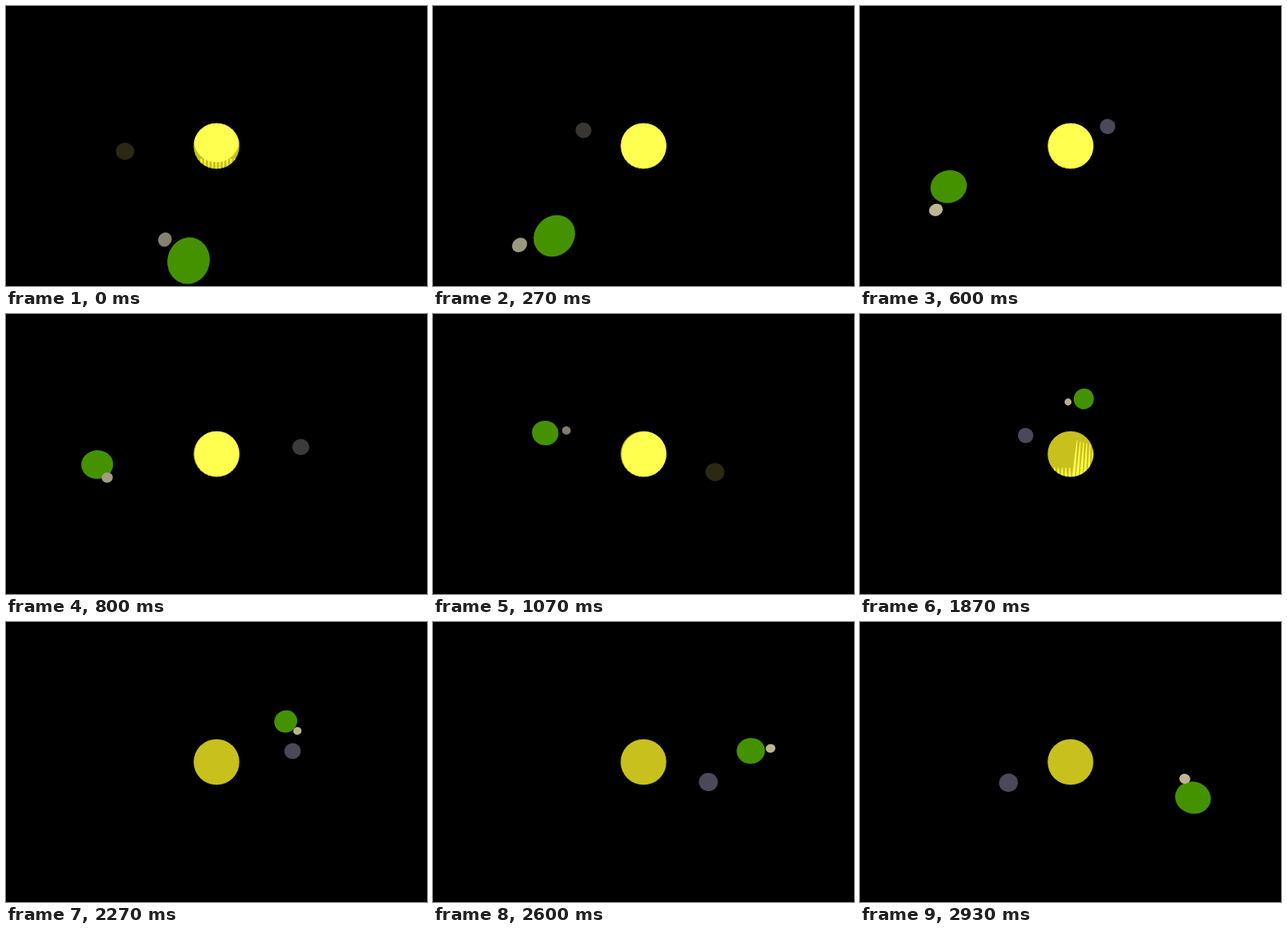
Animation of 512x341 px, one loop 2990 ms. Source, as an HTML page with a canvas:

```html
<!DOCTYPE html>
<html lang="en">
<head>
<meta charset="utf-8">
<title>Orbits</title>
<style>
  html, body { margin: 0; width: 100%; height: 100%; overflow: hidden; background: #000; }
  canvas { display: block; }
</style>
</head>
<body>
<canvas id="stage" width="512" height="341"></canvas>
<script>
const ctx = document.getElementById("stage").getContext("2d");
const LOOP = 2990, STEP = 200 / 3, RAD = Math.PI / 180;
const CX = 256, CY = 170.5, SUN = 27.8;

// Camera at (0, 7, 8) looking at the centre, 60 degree field of view
const DIST = Math.hypot(7, 8), SIN = 7 / DIST, COS = 8 / DIST;
const FOCAL = CY / Math.tan(30 * RAD);

// Rows: step, orbit phase in degrees, warmth of the inner planet, moon light
const KEYS = [
  [0, 0, 1, 0.5], [9, 54, 0, 1], [16, 98.9, 1, 0.45], [21, 132, 1, 0.2],
  [28, 179.9, 0, 0.95], [39, 251.9, 0, 1], [44, 284.8, 0, 1]
];

function track(step, col) {
  let i = 0;
  while (i < KEYS.length - 2 && step > KEYS[i + 1][0]) i++;
  const a = KEYS[i], b = KEYS[i + 1];
  return a[col] + (b[col] - a[col]) * (step - a[0]) / (b[0] - a[0]);
}

function mix(from, to, k) {
  return `rgb(${from.map((v, i) => Math.round(v + (to[i] - v) * k))})`;
}

// A sphere in perspective becomes an ellipse stretched away from the centre
function sphere(x, z, radius, color) {
  const depth = DIST - z * COS;
  const px = FOCAL * x / depth, py = FOCAL * z * SIN / depth;
  const off = Math.hypot(px, py) / FOCAL;
  const cos2 = 1 / (1 + off * off);
  const sin = radius / (depth * Math.sqrt(1 + off * off));
  const gap = cos2 - sin * sin;
  ctx.fillStyle = color;
  ctx.beginPath();
  ctx.ellipse(CX + px, CY + py, FOCAL * sin * Math.sqrt(1 - sin * sin) / gap,
    FOCAL * sin / Math.sqrt(gap), Math.atan2(py, px), 0, 2 * Math.PI);
  ctx.fill();
}

function disc(x, y, r, color) {
  ctx.fillStyle = color;
  ctx.beginPath();
  ctx.arc(x, y, r, 0, 2 * Math.PI);
  ctx.fill();
}

// A streak standing on the lower rim, its tip moved sideways by lean
function streak(x, top, tipWidth, width, lean) {
  ctx.beginPath();
  ctx.moveTo(x + lean - tipWidth / 2, top);
  ctx.lineTo(x + lean + tipWidth / 2, top);
  ctx.lineTo(x + width / 2, 199);
  ctx.lineTo(x - width / 2, 199);
  ctx.fill();
}

function sun(step) {
  const bright = "#ffff50", dark = "#c8c01c";
  ctx.save();
  ctx.beginPath();
  ctx.arc(CX, CY, SUN, 0, 2 * Math.PI);
  ctx.clip();
  disc(CX, CY, 30, dark);
  if (step < 22) {
    // A shaded rim travels from the bottom round to the upper left
    const turn = (90 + step * 6.5) * RAD;
    const shift = Math.max(8 - step * 2, 0.4 + step * 0.06);
    disc(CX - shift * Math.cos(turn), CY - shift * Math.sin(turn), SUN, bright);
    for (let x = 233; x < 284; x += 4.5) streak(x, 186, 2, 1, 0);
  } else {
    // Bright streaks sink away towards the lower right
    const left = 28 - step, grow = Math.max(0, left) * 0.12;
    const width = 4.6 * Math.min(1, 0.75 + grow);
    ctx.fillStyle = bright;
    for (let x = 232; x < 286; x += 4.6) {
      const tall = x > 255;
      const top = (tall ? 153 + (x - 256) * 0.25 : 187) - left * 9;
      const lean = tall ? Math.max(0, 5 - (x - 256) * 0.15) : 0;
      if (top < 199) streak(x, top, width * Math.min(1, 0.25 + grow), width, lean);
    }
  }
  ctx.restore();
}

function draw(step) {
  const phase = track(step, 1);
  ctx.fillStyle = "#000";
  ctx.fillRect(0, 0, 512, 341);
  sun(step);

  const inner = (167.5 + phase * 2.39) * RAD;
  sphere(4 * Math.cos(inner), 1.6 * Math.sin(inner), 0.365,
    mix([75, 72, 88], [43, 40, 20], track(step, 2)));

  const outer = (99.1 + phase) * RAD;
  const x = 5.02 * Math.cos(outer), z = 5.02 * Math.sin(outer);
  sphere(x, z, 0.597, "#459200");

  const moon = (219.4 - phase * 2.341) * RAD;
  sphere(x + Math.cos(moon), z + Math.sin(moon), 0.202,
    mix([78, 76, 80], [188, 182, 146], track(step, 3)));
}

const start = performance.now();
function tick() {
  const time = (performance.now() - start) % LOOP;
  const tens = Math.floor(time / 10) * 10;
  draw(Math.min(44, Math.floor((tens + 5) / STEP)));
  requestAnimationFrame(tick);
}
tick();
</script>
</body>
</html>
```
